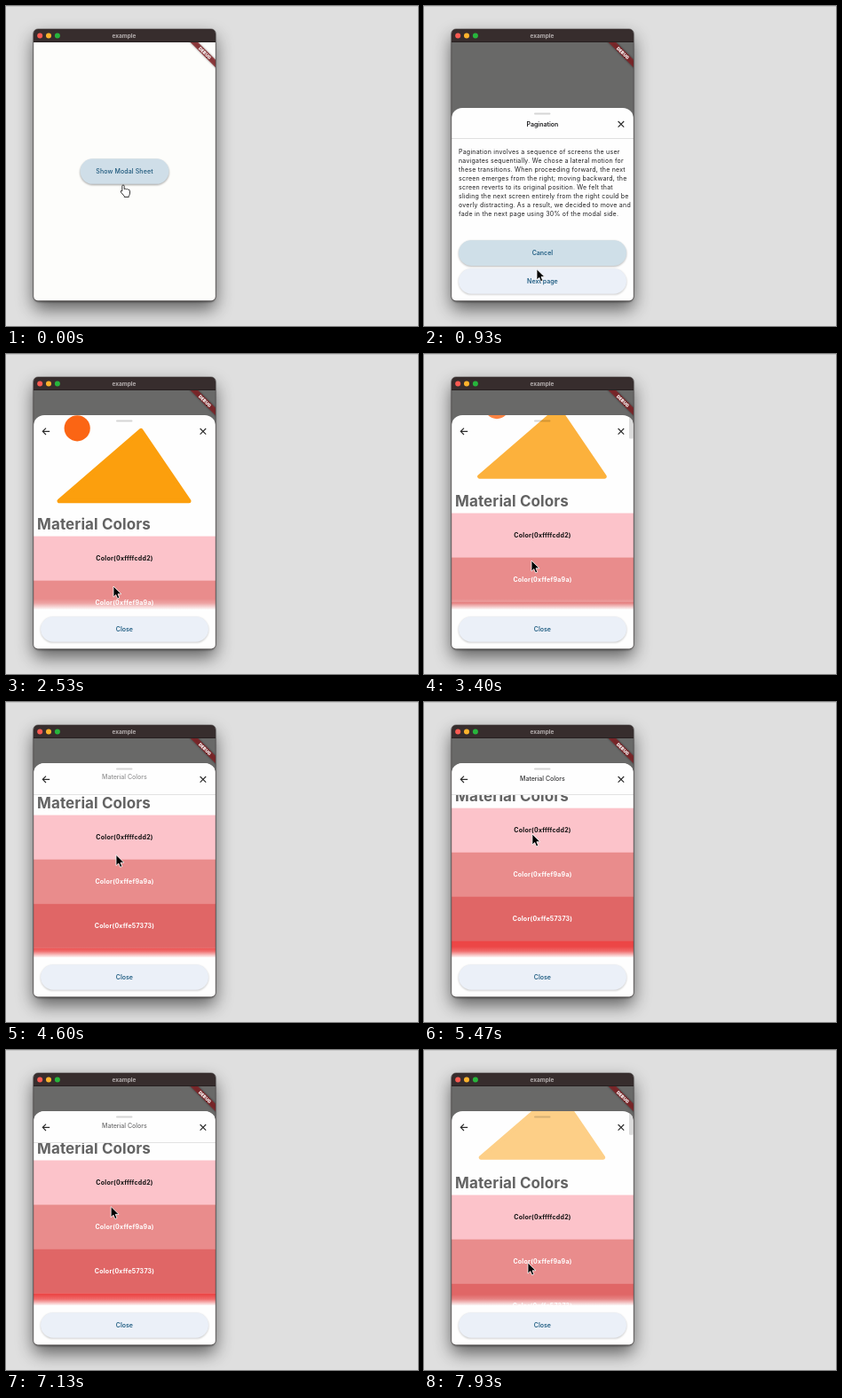
An HTML page for the animation above (8 s loop, 464 by 361 pixels).

```html
<!DOCTYPE html>
<html lang="en">
<head>
<meta charset="utf-8">
<title>Modal sheet</title>
<style>
html, body { margin: 0; width: 100%; height: 100%; overflow: hidden; background: #dfdfdf; }
svg { display: block; width: 464px; height: 361px; }
text { font: 500 7px Inter, "Open Sans", sans-serif; text-anchor: middle; fill: #1d1d1f; white-space: pre; }
.label { font-weight: 600; fill: #225f84; }
.para text { font-weight: 400; letter-spacing: .23px; text-anchor: start; }
.tile { font-weight: 700; letter-spacing: .25px; }
.heading { font-weight: 700; font-size: 17px; letter-spacing: .1px; text-anchor: start; fill: #636363; }
.icon { fill: none; stroke: #2b2b2b; stroke-width: 1.15; }
</style>
</head>
<body>
<svg viewBox="0 0 464 361">
  <defs>
    <filter id="blur" x="-40%" y="-40%" width="180%" height="180%"><feGaussianBlur stdDeviation="10"/></filter>
    <filter id="soft" x="-20%" y="-50%" width="140%" height="200%"><feGaussianBlur stdDeviation="1"/></filter>
    <linearGradient id="fade" x2="0" y2="1">
      <stop offset="0" stop-color="#fefefe" stop-opacity="0"/>
      <stop offset=".4" stop-color="#fefefe" stop-opacity=".2"/>
      <stop offset="1" stop-color="#fefefe"/>
    </linearGradient>
    <clipPath id="frame"><rect x="31" y="26" width="205" height="306.5" rx="5"/></clipPath>
    <clipPath id="view"><rect x="31" y="41" width="205" height="292"/></clipPath>
    <clipPath id="sheetClip"><rect id="sheetBox" x="31" y="115" width="205" height="300" rx="12"/></clipPath>
    <clipPath id="listClip"><rect x="-69" y="69" width="405" height="219"/></clipPath>
  </defs>

  <rect width="464" height="361" fill="#dfdfdf"/>
  <rect width="464" height="1" fill="#c9c9c9"/>
  <rect x="31" y="35" width="205" height="307" rx="6" opacity=".58" filter="url(#blur)"/>
  <rect x="31" y="27" width="205" height="307" rx="6" opacity=".4" filter="url(#soft)"/>

  <g clip-path="url(#frame)">
    <rect x="31" y="26" width="205" height="307" fill="#fdfdfb"/>
    <rect x="31" y="26" width="205" height="15" fill="#372d2d"/>
    <rect x="31" y="40.4" width="205" height=".6" fill="#1d1818"/>
    <circle cx="38.2" cy="33.4" r="3" fill="#fb5a52"/>
    <circle cx="48" cy="33.4" r="3" fill="#fdb32c"/>
    <circle cx="57.9" cy="33.4" r="3" fill="#27b53c"/>
    <text x="133" y="35.7" style="font-weight:700;font-size:6.5px;fill:#b5afaf">example</text>

    <g clip-path="url(#view)">
      <rect x="83.5" y="173.5" width="100" height="28.5" rx="14.2" opacity=".35" filter="url(#soft)"/>
      <rect x="83.5" y="172.3" width="100" height="28.5" rx="14.2" fill="#cfdee8"/>
      <text x="133.5" y="189.1" style="fill:#1b567a;letter-spacing:.12px">Show Modal Sheet</text>
      <rect id="barrier" x="31" y="41" width="205" height="292" opacity="0"/>

      <g id="sheet"><g clip-path="url(#sheetClip)">
        <rect x="31" y="60" width="205" height="300" fill="#fefefe"/>

        <g id="first">
          <g id="firstBody">
            <text x="133.4" y="136.2" style="font-weight:600">Pagination</text>
            <rect x="31" y="149" width="205" height="1" fill="#e0e0e0"/>
            <g id="para" class="para"></g>
          </g>
          <rect x="39" y="265" width="189" height="29" rx="14.5" opacity=".28" filter="url(#soft)"/>
          <rect x="39" y="264.3" width="189" height="28.7" rx="14.4" fill="#cfdfe8"/>
          <text class="label" x="133.4" y="281.2">Cancel</text>
          <rect x="39" y="297" width="189" height="28.6" rx="14.4" opacity=".22" filter="url(#soft)"/>
          <rect x="39" y="296.3" width="189" height="28.4" rx="14.2" fill="#ebf0f8"/>
          <rect id="hover" x="39" y="296.3" width="189" height="28.4" rx="14.2" fill="#225f84" opacity="0"/>
          <text class="label" x="133.4" y="313.2">Next page</text>
        </g>

        <g id="second" opacity="0">
          <g id="secondBody">
            <g clip-path="url(#listClip)">
              <g id="list">
                <g id="hero">
                  <path d="M152 86.3L60 165.8H206Z" fill="#fc9f0d" stroke="#fc9f0d" stroke-width="5" stroke-linejoin="round"/>
                  <circle cx="80.2" cy="83.8" r="14.6" fill="#fb6514"/>
                </g>
                <text class="heading" x="35" y="198.2">Material Colors</text>
                <g id="tiles"></g>
              </g>
              <rect id="thumb" x="231" y="70" width="4.5" height="25" rx="1" fill="#dcdcdc" opacity="0"/>
            </g>
            <g id="bar" opacity="0">
              <rect x="31" y="69" width="205" height="36" fill="#fefefe"/>
              <rect x="31" y="104" width="205" height="1" fill="#e2e2e2"/>
            </g>
            <text id="barTitle" x="133.4" y="89.7" opacity="0">Material Colors</text>
            <path class="icon" d="M49.2 87.3H41.5M45 83.6L41.3 87.3L45 91"/>
          </g>
          <rect x="31" y="276" width="205" height="12.5" fill="url(#fade)"/>
          <rect x="31" y="288" width="205" height="50" fill="#fefefe"/>
          <rect x="39" y="297" width="189" height="28.6" rx="14.4" opacity=".22" filter="url(#soft)"/>
          <rect x="39" y="296.3" width="189" height="28.4" rx="14.2" fill="#ebf0f8"/>
          <text class="label" x="133.4" y="313.2">Close</text>
        </g>

        <g id="chrome">
          <rect x="124" y="120.6" width="18.5" height="2" rx="1" fill="#000" opacity=".16"/>
          <path class="icon" d="M218.6 130L225.2 136.6M225.2 130L218.6 136.6"/>
        </g>
      </g></g>

      <g transform="translate(236 41) rotate(45)">
        <rect x="-22" y="14" width="44" height="6" opacity=".5" filter="url(#soft)"/>
        <rect x="-22" y="14" width="44" height="6" fill="#8a2226" fill-opacity=".78"/>
        <text x="0" y="18.8" style="font-weight:900;font-size:5px;fill:#fff">DEBUG</text>
      </g>
    </g>
  </g>
  <rect x="30.8" y="26" width="205.4" height="306.8" rx="5" fill="none" stroke="#3a3535" stroke-width=".7" stroke-opacity=".8"/>

  <path id="arrow" d="M0 0V12.2L2.8 9.6L4.6 13.9L6.8 13L5 8.8H8.9Z" stroke="#fff" stroke-width=".8" stroke-linejoin="round"/>
  <path id="hand" d="M-1.2 1.2a1.2 1.2 0 0 1 2.4 0V4.6q1-.9 2.2.1q1.2-.7 2.1.4q2-.3 2 1.6V9q0 2-1.2 3.4V13.5H1.2V12.4L-2.6 8q-.7-1.6.8-1.6L-1.2 7Z" fill="#fff" stroke="#222" stroke-width=".9" stroke-linejoin="round"/>
</svg>
<script>
const LOOP = 8000;
const $ = id => document.getElementById(id);
const set = (id, attrs) => { for (const k in attrs) $(id).setAttribute(k, attrs[k]); };
const clamp = v => Math.min(1, Math.max(0, v));
const span = (t, a, b) => clamp((t - a) / (b - a));
const easeOut = p => 1 - (1 - p) ** 3;
const easeInOut = p => p * p * (3 - 2 * p);

const lines = [
  'Pagination involves a sequence of screens the user',
  'navigates sequentially. We chose a lateral motion for',
  'these transitions. When proceeding forward, the next',
  'screen emerges from the right; moving backward, the',
  'screen reverts to its original position. We felt that',
  'sliding the next screen entirely from the right could be',
  'overly distracting. As a result, we decided to move and',
  'fade in the next page using 30% of the modal side.'
];
$('para').innerHTML = lines.map((s, i) =>
  `<text x="39" y="${166.8 + i * 10}">${s}</text>`).join('');

// fill as displayed, label, label colour
const tiles = [
  ['#fcc3ca', 'ffffcdd2', '#111'],
  ['#e98c8c', 'ffef9a9a', '#fff'],
  ['#e06666', 'ffe57373', '#fff'],
  ['#ec4646', 'ffef5350', '#fff'],
  ['#e53935', 'fff44336', '#fff']
];
$('tiles').innerHTML = tiles.map(([fill, hex, ink], i) => {
  const y = 205.6 + i * 50;
  return `<rect x="31" y="${y}" width="205" height="50.3" fill="${fill}"/>` +
    `<text class="tile" x="133.5" y="${y + 27.6}" style="fill:${ink}">Color(0x${hex})</text>`;
}).join('');

const cursor = [
  [0, 132, 202], [250, 132, 203], [880, 127, 296.5], [960, 127, 297], [1300, 129, 304],
  [1850, 129, 304], [2460, 121, 262], [2870, 121, 262], [3400, 121, 233], [4560, 124, 172.5],
  [4800, 124, 172], [5450, 122, 150], [6200, 119, 111], [6470, 119, 113], [7270, 118, 190], [7930, 117, 240]
];
const scroll = [
  [0, 0], [2870, 0], [3400, 26], [4000, 54], [4560, 78], [4700, 78], [5420, 84],
  [6200, 113], [6300, 113], [6400, 112], [7300, 74], [7930, 42]
];

function track(keys, t, col) {
  const i = keys.findIndex(k => k[0] > t);
  if (i < 0) return keys[keys.length - 1][col];
  const a = keys[i - 1], b = keys[i];
  return a[col] + (b[col] - a[col]) * (t - a[0]) / (b[0] - a[0]);
}

function draw(t) {
  const open = easeOut(span(t, 130, 560));
  set('barrier', { opacity: .585 * open });
  set('sheet', { transform: `translate(0 ${220 * (1 - open)})` });

  // page change: grow, slide by 30 %, cross-fade
  const k = easeInOut(span(t, 1800, 2200));
  const top = 115 - 46 * k;
  set('sheetBox', { y: top });
  set('chrome', { transform: `translate(0 ${top - 115})` });
  set('first', { transform: `translate(${-61.5 * k} 0)`, opacity: 1 - span(t, 1810, 1970) });
  set('firstBody', { transform: `translate(0 ${top - 115})` });
  set('second', { transform: `translate(${61.5 * (1 - k)} 0)`, opacity: span(t, 1960, 2200) });
  set('secondBody', { transform: `translate(0 ${top - 69})` });
  set('hover', { opacity: .07 * span(t, 990, 1100) });

  const off = track(scroll, t, 1);
  const scale = 1 - off * .00135;
  const title = span(off, 69, 88);
  set('list', { transform: `translate(0 ${-off})` });
  set('hero', {
    transform: `translate(133 123) scale(${scale}) translate(-133 -123)`,
    opacity: clamp((67 - off) / 51)
  });
  set('thumb', { y: 70 + off * .02, opacity: span(t, 2900, 3050) });
  set('bar', { opacity: span(off, 65, 73) });
  set('barTitle', { opacity: title, y: 84 + 5.9 * title });

  const pointing = t < 330 || (t > 990 && t < 1960);
  const at = `translate(${track(cursor, t, 1)} ${track(cursor, t, 2)})`;
  set('arrow', { transform: at, opacity: pointing ? 0 : 1 });
  set('hand', { transform: at, opacity: pointing ? 1 : 0 });
}

const start = performance.now();
function tick() {
  draw((performance.now() - start) % LOOP);
  requestAnimationFrame(tick);
}
tick();
</script>
</body>
</html>
```
